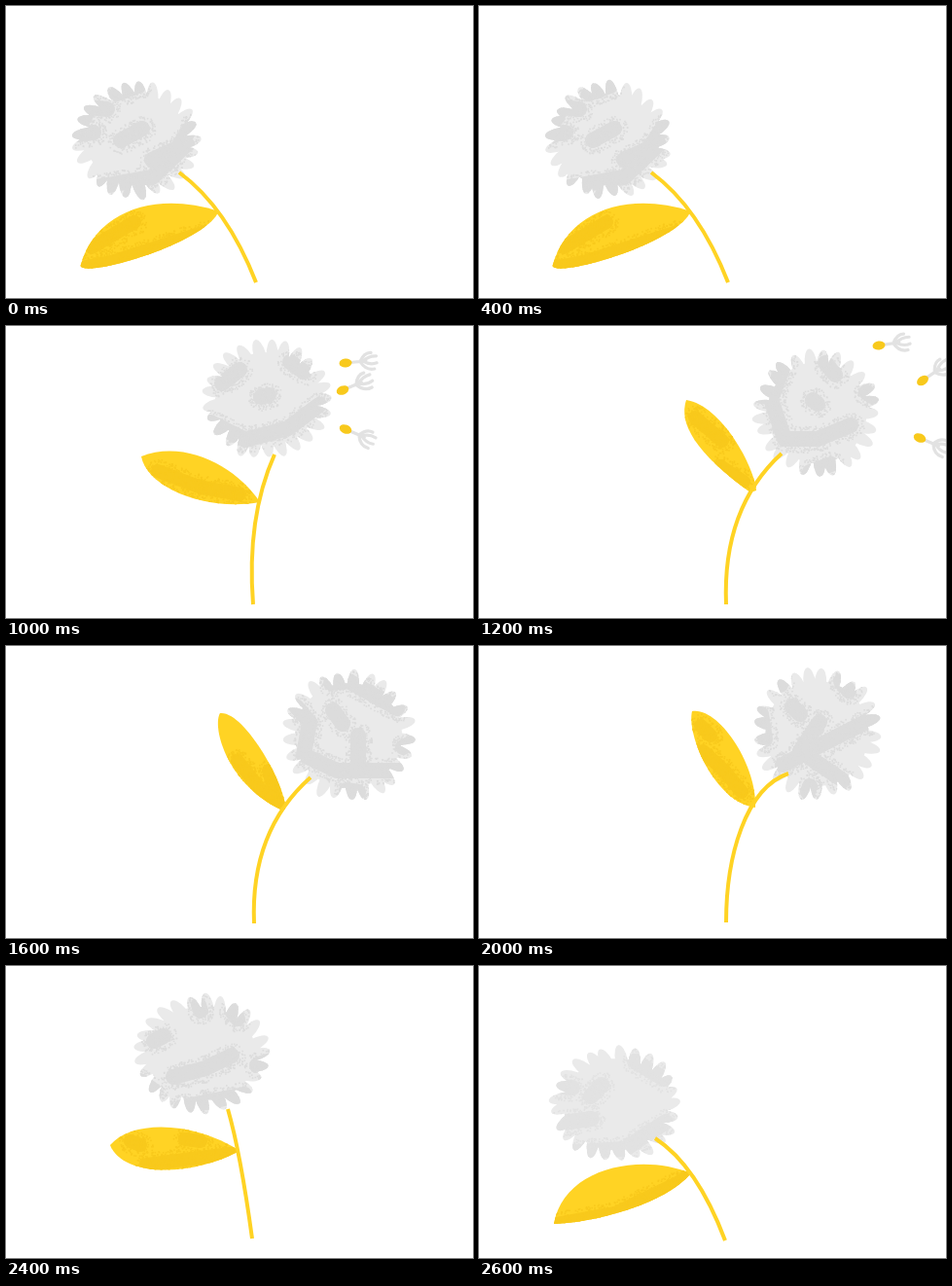
Write an HTML page with a canvas that moves like this. It is 480x300 px and loops after 2.8 s.

```html
<!DOCTYPE html>
<html lang="en">
<head>
<meta charset="utf-8">
<title>Flower in the wind</title>
<style>
  html, body { margin: 0; width: 100%; height: 100%; overflow: hidden; background: #fff; }
  canvas { display: block; }
</style>
</head>
<body>
<canvas id="stage" width="480" height="300"></canvas>
<script>
const ctx = document.getElementById('stage').getContext('2d');
const STEP = 200;
const GREY = '#eaeaea', SHADE = '#dcdcdc', YELLOW = '#ffd324', OCHRE = '#f8c91c';

function random(seed) {
  return () => {
    seed = (seed * 16807 + 11) % 2147483647;
    return seed / 2147483647;
  };
}

// head: centre x, y, radii, lean of the petals; the rest are paths
const pose = (head, stem, leaf, headShade, leafShade) => ({
  head, headShade: new Path2D(headShade), leafShade: new Path2D(leafShade),
  stem: new Path2D(stem), leaf: new Path2D(leaf)
});

const low = pose([134.5, 137.5, 65, 60, -.3],
  'M178 171Q227 207 257 284',
  'M218.5 211C155 190 92 210 76.5 267C82 280 206 243 218.5 211Z',
  'M80 116L86 104L104 106M114 90L136 82M74 132L90 130M118 138L140 126M192 122L176 146L150 158M186 142L150 176L94 186M128 194L140 190',
  'M88 248L132 222M82 268L112 262L205 232');

const lowReturn = pose([140.5, 142, 67, 60, -.3],
  'M181 177Q224 205 253 282',
  'M218 213C165 191 86 208 77 265C115 264 190 246 218 213Z',
  'M85 124L96 125M115 134L126 122M78 162L116 157M84 192L150 188L192 160M160 98L190 116',
  'M80 265L140 254L216 217');

const middle = pose([201, 94, 69, 60, -.3],
  'M228 148Q248.5 206 253 282',
  'M240 190C205 160 122 156 105.5 186C118 219 200 216 240 190Z',
  'M138 124L152 132M158 142L190 136L214 124L224 110M222 82L254 64M174 91L196 90M174 54L184 52M203 62L208 62M210 146L216 148M262 124L256 128',
  'M118 184L160 194L230 186M130 200L210 202');

const middleReturn = pose([201, 90, 69, 61, -.3],
  'M228 147Q241 192 253 280',
  'M240 190C195 160 130 157 107 184C120 217 190 217 240 190Z',
  'M152 77L162 72M172 114L205 105L232 92M198 40L200 46M232 46L238 54M180 145L245 132M138 118L152 128M258 102L268 98',
  'M128 180L138 184M184 178L200 180M145 204L238 192');

const upright = pose([268, 74, 66, 61, -.15],
  'M276 131Q247 196 254 285',
  'M261 180C238 145 185 115 139 133C145 165 205 190 261 180Z',
  'M222 58L240 44M210 98L246 116L290 104L322 80M262 72L270 70M292 36L306 46',
  'M156 148L198 164L240 172');

const swayBack = pose([308, 79, 65, 64, 0],
  'M291 134Q248 191 254 286',
  'M272 176C262 144 220 94 176 104C178 135 212 164 272 176Z',
  'M266 48L260 80L280 118L344 104M304 74L310 76M332 38L350 60',
  'M190 122L224 144L255 166');

const right = pose([347.5, 89, 64, 65, 0],
  'M311 131Q250 187 254 286',
  'M285 169L279 171C222 130 205 100 213 76C250 82 283 145 285 169Z',
  'M314 38L300 75L314 116L348 116L382 102M343 76L348 80M356 38L366 50M398 68L404 72M300 62L290 72M340 150L362 142',
  'M222 94L250 118M248 144L272 160');

const rightBent = pose([352, 92, 68, 67, 0],
  'M313 135Q251 190 255 285',
  'M287 168L282 168C225 140 212 82 220 69C245 66 289 145 287 168Z',
  'M334 38L352 36L402 64M298 62L312 78L306 112L340 128L404 128M336 66L346 80M362 92L362 120M408 104L416 100M350 148L362 150',
  'M238 118L262 148L280 160M270 128L276 150');

const rightLeaf = pose([347.5, 90, 66, 67, 0],
  'M318 131C274 146 254 216 254 284',
  'M284 166C286 122 246 62 219 67C213 92 243 161 284 166Z',
  'M322 62L330 70M350 78L330 108L374 138M406 74L370 92L312 122M290 70L294 96M372 36L380 46M338 150L340 144M308 34L310 40',
  'M228 82L238 92M230 108L252 128L270 150');

// [head x, head y, tilt]
const seedsNear = [[349, 38, -.1], [346, 66, -.4], [349, 106, .4]];
const seedsFar = [[411, 20, -.15], [456, 56, -.6], [453, 115, .4]];
const seedsLast = [[458, 30, -.1]];

// [pose, shift x, shift y, flying seeds]
const scenes = [
  [low, 0, 0], [low, -2, 0], [low, -1, 0], [low, 0, -1],
  [middle, 0, 0], [upright, 0, 1, seedsNear], [right, 0, 0, seedsFar],
  [swayBack, 0, 0, seedsLast], [rightBent, 0, 0], [right, 0, -1],
  [rightLeaf, 0, 0], [upright, 1, -1], [middleReturn, 0, 0], [lowReturn, 0, 0]
];

function flowerShape([cx, cy, rx, ry, lean], rnd) {
  const shape = new Path2D(), count = 25;
  shape.ellipse(cx, cy, rx - 13, ry - 13, 0, 0, 7);
  for (let i = 0; i < count; i++) {
    const angle = (i + rnd() * .3) / count * Math.PI * 2;
    const length = 15 + rnd() * 3, inset = 14.5 + rnd() * 3;
    const x = cx + Math.cos(angle) * (rx - inset);
    const y = cy + Math.sin(angle) * (ry - inset);
    const petal = new Path2D();
    petal.ellipse(x, y, length, 6.3, angle + lean, 0, 7);
    shape.addPath(petal);
  }
  return shape;
}

// Fills a shape and adds brushed shading with a stippled edge
function paint(shape, shade, colour, dark, width, box, shift, rnd) {
  ctx.save();
  ctx.fillStyle = colour;
  ctx.fill(shape);
  ctx.clip(shape);
  ctx.strokeStyle = ctx.fillStyle = dark;
  ctx.lineWidth = width;
  ctx.stroke(shade);
  ctx.lineWidth = width + 11;
  const [left, top, w, h] = box;
  for (let i = w * h / 5; i > 0; i--) {
    const x = left + rnd() * w, y = top + rnd() * h;
    if (ctx.isPointInStroke(shade, x + shift[0], y + shift[1])) ctx.fillRect(x, y, 1.6, 1.6);
  }
  ctx.restore();
}

function drawSeed([x, y, tilt]) {
  ctx.save();
  ctx.translate(x, y);
  ctx.rotate(tilt);
  ctx.strokeStyle = '#e2e2e2';
  ctx.lineWidth = 3.2;
  ctx.stroke(new Path2D('M5 0H21M15 0Q20 -9 27 -8M18 0Q24 -5 32 -4M18 0Q25 5 32 3M15 0Q20 10 29 9'));
  ctx.fillStyle = OCHRE;
  ctx.beginPath();
  ctx.ellipse(0, 0, 6.5, 4.5, 0, 0, 7);
  ctx.fill();
  ctx.restore();
}

function draw(index) {
  const [p, dx, dy, seeds = []] = scenes[index];
  const rnd = random(index * 7919 + 101), shift = [dx, dy];
  const [cx, cy, rx, ry] = p.head;
  ctx.clearRect(0, 0, 480, 300);
  ctx.lineCap = ctx.lineJoin = 'round';
  ctx.save();
  ctx.translate(dx, dy);
  paint(p.leaf, p.leafShade, YELLOW, OCHRE, 14, [75, 65, 215, 210], shift, rnd);
  const shade = p === lowReturn ? '#e2e2e2' : SHADE;
  paint(flowerShape(p.head, rnd), p.headShade, GREY, shade, 16,
    [cx - rx, cy - ry, rx * 2, ry * 2], shift, rnd);
  ctx.strokeStyle = YELLOW;
  ctx.lineWidth = 4;
  ctx.lineCap = 'butt';
  ctx.stroke(p.stem);
  ctx.restore();
  seeds.forEach(drawSeed);
}

let shown = -1;
function tick() {
  const index = Math.floor(performance.now() / STEP) % scenes.length;
  if (index !== shown) draw(shown = index);
  requestAnimationFrame(tick);
}
tick();
</script>
</body>
</html>
```
